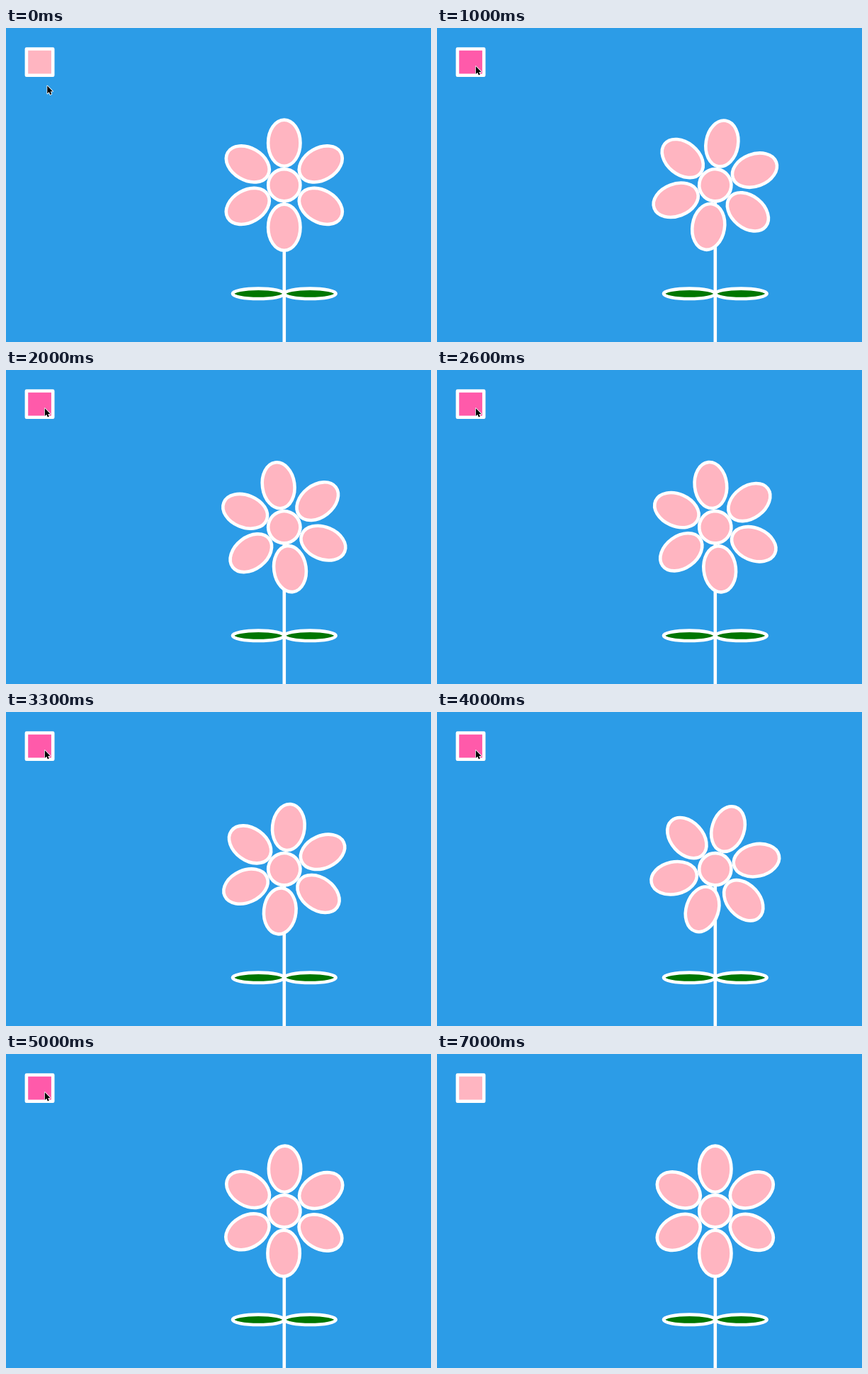
These frames come from a looping animation (600 px wide and 443 px high, 7.1 s). An HTML page with a canvas:

```html
<!DOCTYPE html>
<html lang="en">
<head>
<meta charset="utf-8">
<title>Spinning flower</title>
<style>
  html, body { margin: 0; width: 100%; height: 100%; overflow: hidden; background: #2c9ce7; }
  canvas { display: block; }
</style>
</head>
<body>
<canvas id="stage" width="600" height="443"></canvas>
<script>
const ctx = document.getElementById('stage').getContext('2d');

const LOOP = 7100, STEP = 100;
const PRESS = 900, RELEASE = 5300, SPIN_START = 910, TURN = 3500;
const LEAVE = 5800, HIDE = 6300;
const SKY = '#2c9ce7', PINK = '#ffb5c1', HOT = '#ff5aaa', GREEN = '#007600';
const FLOWER = { x: 392.8, y: 221.7 };

const clamp01 = v => Math.min(1, Math.max(0, v));
const smooth = v => v * v * (3 - 2 * v);
const mix = (a, b, k) => a + (b - a) * k;

function ellipse(x, y, rx, ry, fill) {
  ctx.beginPath();
  ctx.ellipse(x, y, rx, ry, 0, 0, Math.PI * 2);
  ctx.fillStyle = fill;
  ctx.fill();
  ctx.stroke();
}

function drawButton(pressed) {
  ctx.fillStyle = pressed ? HOT : PINK;
  ctx.beginPath();
  ctx.rect(28.9, 29.5, 37.3, 37.3);
  ctx.fill();
  ctx.stroke();
}

function drawStem() {
  ctx.beginPath();
  ctx.moveTo(FLOWER.x, FLOWER.y);
  ctx.lineTo(FLOWER.x, 450);
  ctx.stroke();
  for (const side of [-1, 1]) ellipse(FLOWER.x + side * 36.5, 374.8, 36.4, 7.2, GREEN);
}

function drawBloom(angle) {
  ctx.save();
  ctx.translate(FLOWER.x, FLOWER.y);
  ctx.rotate(angle);
  for (let i = 0; i < 6; i++) {
    ellipse(0, -59.5, 22.7, 32.6, PINK);
    ctx.rotate(Math.PI / 3);
  }
  ellipse(0, 0, 22.6, 22.6, PINK);
  ctx.restore();
}

function drawCursor(t) {
  if (t >= HIDE) return;
  const k = t < LEAVE
    ? smooth(clamp01(t / 800))
    : 1 - smooth(clamp01((t - LEAVE) / (HIDE - LEAVE)));
  ctx.save();
  ctx.translate(mix(58.3, 54.8, k), mix(81.6, 54.1, k));
  ctx.beginPath();
  ctx.moveTo(0, 0);
  ctx.lineTo(0, 11);
  ctx.lineTo(2.5, 8.7);
  ctx.lineTo(4.1, 12.5);
  ctx.lineTo(6, 11.7);
  ctx.lineTo(4.4, 8);
  ctx.lineTo(7.7, 7.8);
  ctx.closePath();
  ctx.lineWidth = 1.6;
  ctx.stroke();
  ctx.fillStyle = '#000';
  ctx.fill();
  ctx.restore();
}

function draw(t) {
  const pressed = t >= PRESS && t < RELEASE;
  const spin = pressed ? Math.max(0, t - SPIN_START) / TURN * Math.PI * 2 : 0;
  ctx.fillStyle = SKY;
  ctx.fillRect(0, 0, 600, 443);
  ctx.strokeStyle = '#fff';
  ctx.lineWidth = 4.6;
  ctx.lineJoin = 'round';
  drawButton(pressed);
  drawStem();
  drawBloom(spin);
  drawCursor(t);
}

let start;
function tick(now) {
  start ??= now;
  // Ten poses a second; the small lead absorbs frame timing jitter.
  draw(Math.floor((now - start + 16) / STEP) * STEP % LOOP);
  requestAnimationFrame(tick);
}
draw(0);
requestAnimationFrame(tick);
</script>
</body>
</html>
```
